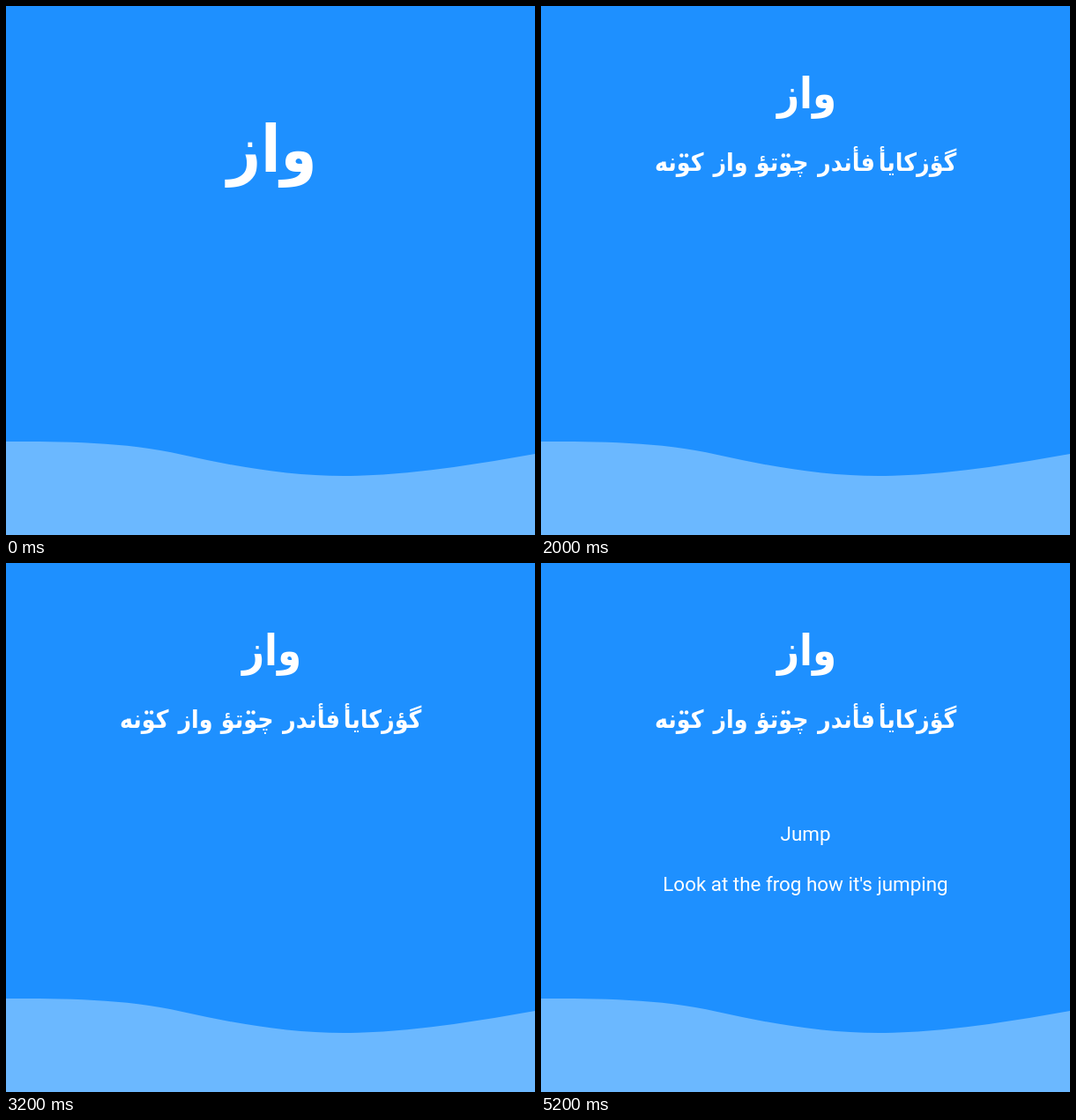
An HTML page for the animation above (6 s loop, 600x600 px).

```html
<!DOCTYPE html>
<html lang="en">
<head>
<meta charset="utf-8">
<title>Word card</title>
<style>
  html, body { margin: 0; width: 100%; height: 100%; overflow: hidden; background: #1e90ff; }
  svg { display: block; width: 100%; height: 100%; }
  text { fill: #fff; text-anchor: middle; }
  .rtl { direction: rtl; }
  .latin { font: 22.4px Roboto, sans-serif; }
</style>
</head>
<body>
<svg viewBox="0 0 600 600" xmlns="http://www.w3.org/2000/svg">
  <rect width="600" height="600" fill="#1e90ff"/>
  <path fill="#6bb8ff" d="M0 494C67 494 133 494 200 509C267 524 333 535 400 532.8C467 530.5 533 520 600 508V600H0Z"/>
  <g id="title"></g>
  <g id="example"></g>
  <g id="meaning" class="latin">
    <text x="300" y="315">Jump</text>
    <text x="300" y="372">Look at the frog how it's jumping</text>
  </g>
</svg>
<script>
const NS = 'http://www.w3.org/2000/svg';
const STEP = 2000, LOOP = 3 * STEP;
const $ = id => document.getElementById(id);
const ctx = document.createElement('canvas').getContext('2d');
const font = size => `bold condensed ${size}px "DejaVu Sans", sans-serif`;

function add(parent, tag, attrs) {
  const el = document.createElementNS(NS, tag);
  for (const k in attrs) el.setAttribute(k, attrs[k]);
  return parent.appendChild(el);
}

// Ink bounds per 1px of font size, relative to a centred anchor
function ink(str) {
  ctx.font = font(200);
  ctx.direction = 'rtl';
  ctx.textAlign = 'center';
  const m = ctx.measureText(str);
  const left = -m.actualBoundingBoxLeft / 200, right = m.actualBoundingBoxRight / 200;
  return {
    width: right - left,
    mid: (left + right) / 2,
    drop: (m.actualBoundingBoxAscent - m.actualBoundingBoxDescent) / 400
  };
}

function word(parent, str, size, cx, y) {
  const el = add(parent, 'text', { class: 'rtl', x: cx - ink(str).mid * size, y });
  el.style.font = font(size);
  el.textContent = str;
  return el;
}

function titleWord(cx, cy, width) {
  const box = ink('واز'), size = width / box.width;
  return word($('title'), 'واز', size, cx, cy + box.drop * size);
}

const large = titleWord(298, 169.5, 100);
const small = titleWord(299, 103.5, 66);

// Each word: text, left, right, index of the waw that carries two dots
const words = [
  ['گؤزکایأ', 386, 470],
  ['فأندر', 313, 377],
  ['چوتؤ', 241, 303, 1],
  ['واز', 196, 231],
  ['کونه', 129, 186, 1]
];
const sum = f => words.reduce((n, w) => n + f(w), 0);
const size = sum(w => w[2] - w[1]) / sum(w => ink(w[0]).width);
const baseline = 187;

$('example').setAttribute('aria-label', 'گؤزکایأ فأندر چۊتؤ واز کۊنه');
for (const [str, left, right, dotted] of words) {
  const el = word($('example'), str, size, (left + right) / 2, baseline);
  if (!dotted) continue;
  const e = el.getExtentOfChar(dotted);
  for (const side of [-1, 1]) {
    add($('example'), 'circle', {
      cx: e.x + e.width * 0.53 + side * size * 0.1,
      cy: baseline - size * 0.62,
      r: size * 0.078,
      fill: '#fff'
    });
  }
}

const show = (el, on) => el.setAttribute('visibility', on ? 'visible' : 'hidden');

function draw(t) {
  const stage = Math.floor((t % LOOP) / STEP);
  show(large, stage === 0);
  show(small, stage > 0);
  show($('example'), stage > 0);
  show($('meaning'), stage > 1);
}

const start = performance.now();
function tick() {
  draw(performance.now() - start);
  requestAnimationFrame(tick);
}
tick();
</script>
</body>
</html>
```
